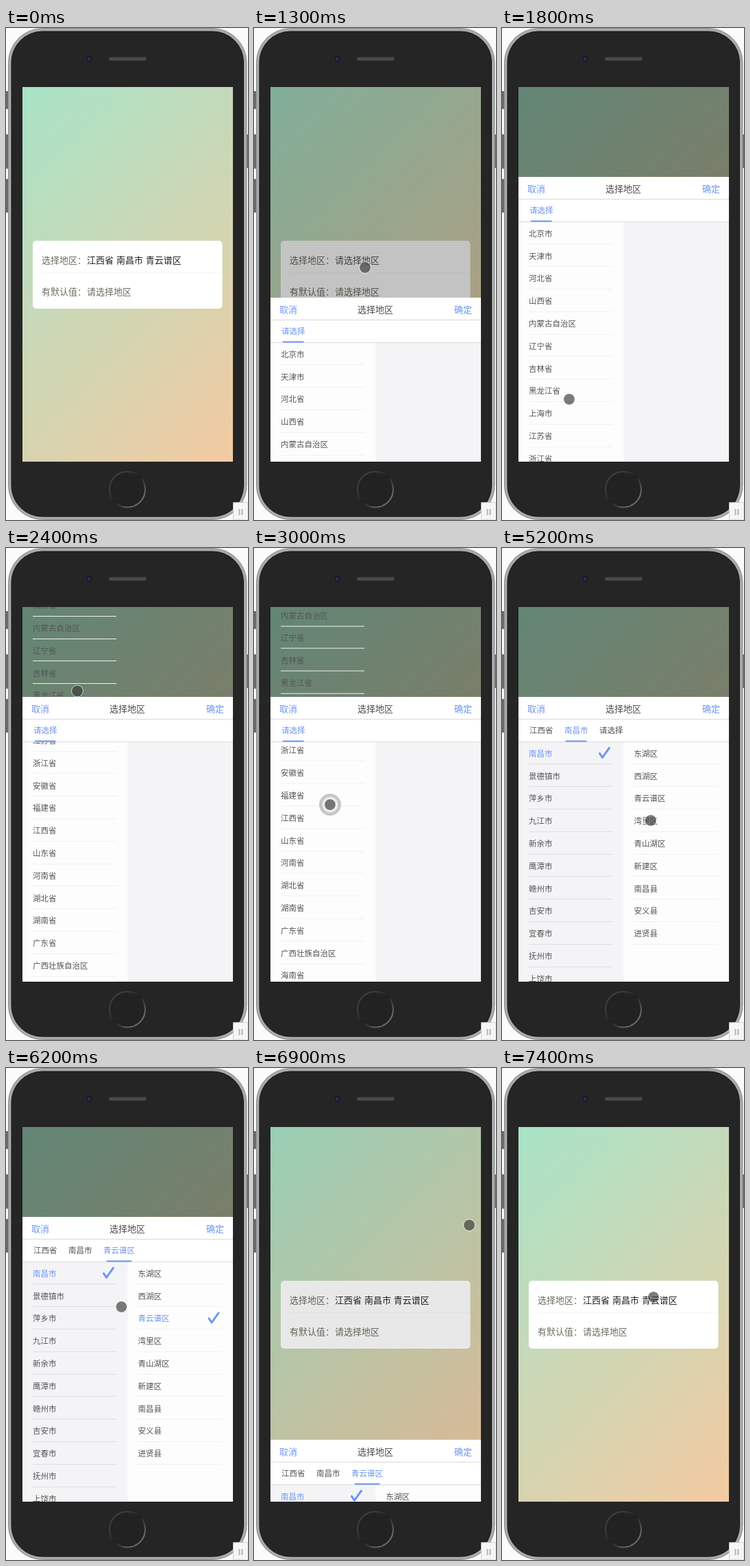
Recreate the animation shown at these times as an HTML page. Size 353 by 717 pixels, loop 7500 ms.

```html
<!DOCTYPE html>
<html lang="zh-CN">
<head>
<meta charset="utf-8">
<title>选择地区</title>
<style>
  html, body { margin: 0; height: 100%; overflow: hidden; background: #fbfbfb; }
  svg { display: block; }
  text { font: 13px "Noto Sans CJK SC", "Noto Sans CJK", sans-serif; fill: #4c4c4c; white-space: pre; }
  .small { font-size: 11.5px; fill: #555; }
  .label { fill: #6c6d60; }
  .blue, .small.blue { fill: #6c96f2; }
  .check { fill: none; stroke: #6c96f2; stroke-width: 3; stroke-linecap: round; stroke-linejoin: round; }
</style>
</head>
<body>
<svg width="353" height="717" viewBox="0 0 353 717">
  <defs>
    <linearGradient id="wall" gradientUnits="userSpaceOnUse" x1="-36" y1="146" x2="391" y2="572">
      <stop stop-color="#a8e3c7"/><stop offset="1" stop-color="#f3caa2"/>
    </linearGradient>
    <linearGradient id="rim" x2="1" y2="1">
      <stop stop-color="#484848"/><stop offset=".3" stop-color="#3a3a3a"/>
      <stop offset=".5" stop-color="#1c1c1c"/><stop offset=".7" stop-color="#555"/>
      <stop offset="1" stop-color="#8a8a8a"/>
    </linearGradient>
    <clipPath id="screen"><rect x="24" y="86" width="307" height="546"/></clipPath>
  </defs>

  <path d="M1.5 92v26M1.5 155v50M1.5 220v49M351.5 155v49" stroke="#6b6b6d" stroke-width="3"/>
  <rect x="3.5" y=".5" width="347.5" height="716" rx="50" fill="#a9aaac" stroke="#8b8c8e"/>
  <rect x="8" y="5" width="338.500" height="707" rx="45" fill="#252526" stroke="#151515"/>
  <circle cx="121.500" cy="45" r="4.500" fill="#1b1b2c"/>
  <circle cx="121.500" cy="45" r="2" fill="#34345c"/>
  <rect x="150" y="42.500" width="55" height="5" rx="2.500" fill="#4a4a4b"/>
  <circle cx="177" cy="672.500" r="26" fill="#222223" stroke="url(#rim)" stroke-width="2"/>

  <g clip-path="url(#screen)">
    <rect x="24" y="86" width="307" height="546" fill="url(#wall)"/>
    <rect x="39" y="310" width="276.500" height="99" rx="5" fill="#fff"/>
    <path d="M52 356.500H315" stroke="#f7f7f7"/>
    <g id="form"></g>
    <rect id="shade" x="24" y="86" width="307" height="546"/>
    <g id="sheet">
      <g id="columns"></g>
      <rect x="24" width="307" height="66" fill="#fff"/>
      <path d="M24 32.500H331M24 65.500H331" stroke="#d9d9db"/>
      <g id="header"></g>
      <rect id="underline" y="63.500" height="2" rx="1" fill="#6c96f2"/>
    </g>
  </g>

  <g id="pointer">
    <g id="ripple">
      <circle r="16" fill="#999" fill-opacity=".55"/>
      <circle r="11.500" fill="#fff" fill-opacity=".65"/>
    </g>
    <circle r="8" fill="#3c3c3c" fill-opacity=".68"/>
    <circle r="8.500" fill="none" stroke="#fff" stroke-opacity=".6"/>
  </g>

  <path d="M331.500 717V691.500H353V717Z" fill="#f6f6f6" stroke="#cfcfcf"/>
  <path d="M340.500 701v9M344.500 701v9" stroke="#b5b5b5" stroke-width="2"/>
</svg>

<script>
const LOOP = 7500, TICK = 100;
const ROW = 32.8, HALF = 153.5, TOP = 217, BOTTOM = 632, LIST_TOP = 66;
const PROVINCE_AT = 3500, CITY_AT = 4100, DISTRICT_AT = 5800, CONFIRM_AT = 6900;
const PICKED = ['江西省', '南昌市', '青云谱区'];
const LISTS = [
  '北京市 天津市 河北省 山西省 内蒙古自治区 辽宁省 吉林省 黑龙江省 上海市 江苏省 浙江省 安徽省 福建省 江西省 山东省 河南省 湖北省 湖南省 广东省 广西壮族自治区 海南省 重庆市',
  '南昌市 景德镇市 萍乡市 九江市 新余市 鹰潭市 赣州市 吉安市 宜春市 抚州市 上饶市',
  '东湖区 西湖区 青云谱区 湾里区 青山湖区 新建区 南昌县 安义县 进贤县'
].map(names => names.split(' '));

// Keyframes: time followed by the animated values.
const SCROLL = [[1800, 0], [2500, 332.4]];
const POINTER = [
  [1000, 162, 349], [1300, 162, 349], [1800, 98, 541], [2300, 104, 185], [2500, 104, 232],
  [2600, 104, 232], [2950, 111, 374], [3100, 111, 374], [3300, 114, 391], [3500, 114, 391],
  [3900, 214, 300], [4200, 214, 300], [5200, 217, 397], [5500, 206, 366], [5800, 206, 366],
  [6300, 164, 346], [6700, 314, 229], [6900, 314, 229], [7400, 221, 334]
];
const PRESSES = [[1100, 1200], [3000, 3200], [3400, 3500], [4000, 4100], [5600, 5800], [6700, 6900]];

const $ = id => document.getElementById(id);

function add(parent, tag, attrs, content = '') {
  const node = document.createElementNS('http://www.w3.org/2000/svg', tag);
  for (const key in attrs) node.setAttribute(key, attrs[key]);
  node.textContent = content;
  return parent.appendChild(node);
}

const label = (parent, x, y, content, cls = '') =>
  add(parent, 'text', { x, y, dy: '.38em', class: cls }, content);

const move = (node, x, y) => node.setAttribute('transform', `translate(${x} ${y})`);
const show = (node, visible) => node.setAttribute('visibility', visible ? 'inherit' : 'hidden');

// The CSS "ease" curve, solved by bisection.
function ease(x) {
  if (x <= 0 || x >= 1) return x <= 0 ? 0 : 1;
  const bezier = (a, b, s) => 3 * a * (1 - s) ** 2 * s + 3 * b * (1 - s) * s * s + s ** 3;
  let low = 0, high = 1;
  for (let i = 0; i < 20; i++) {
    const mid = (low + high) / 2;
    if (bezier(.25, .25, mid) < x) low = mid; else high = mid;
  }
  return bezier(.1, 1, low);
}

function track(keys, t) {
  const next = keys.findIndex(key => key[0] > t);
  if (next < 0) return keys[keys.length - 1].slice(1);
  if (next === 0) return keys[0].slice(1);
  const a = keys[next - 1], b = keys[next];
  const u = (t - a[0]) / (b[0] - a[0]), s = u * u * (3 - 2 * u);
  return a.slice(1).map((v, i) => v + (b[i + 1] - v) * s);
}

label($('form'), 52, 338, '选择地区：', 'label');
label($('form'), 52, 384, '有默认值：', 'label');
const value = label($('form'), 118, 338, '');
value.style.wordSpacing = '1px';
label($('form'), 118, 384, '请选择地区', 'label');

label($('header'), 37, 17, '取消', 'blue');
label($('header'), 151, 17, '选择地区');
label($('header'), 292, 17, '确定', 'blue');
const tabs = [0, 1, 2].map(i => label($('header'), 40 + 51 * i, 49, '', 'small'));

const columns = LISTS.map((names, i) => {
  const x = 24 + HALF * i;
  add($('columns'), 'rect', { x, y: LIST_TOP, width: HALF + .5, height: 350, fill: i === 1 ? '#f4f4f7' : '#fdfdfd' });
  const list = add($('columns'), 'g', {});
  names.forEach((name, n) => {
    const y = LIST_TOP + ROW * (n + .5);
    add(list, 'path', { d: `M${x + 15} ${Math.round(y + 16) - .5}h122`, stroke: i === 1 ? '#e0e0e4' : '#f1f1f1' });
    const text = label(list, x + 15, y, name, 'small');
    if (name === PICKED[i]) {
      list.pick = text;
      list.check = add(list, 'path', { d: `M${x + 118.5} ${y}l4 6 10-14`, class: 'check' });
    }
  });
  return list;
});

function draw(t) {
  const open = ease((t - 1200) / 300) - ease((t - 6800) / 208);
  const chosen = [PROVINCE_AT, CITY_AT, DISTRICT_AT].filter(at => t >= at).length;
  const active = Math.max(0, chosen - 1);

  const filled = t < 1000 || t >= CONFIRM_AT;
  value.textContent = filled ? PICKED.join(' ') : '请选择地区';
  value.style.fill = filled ? '#222' : '#555';

  $('shade').setAttribute('opacity', .41 * open);
  move($('sheet'), 0, BOTTOM + (TOP - BOTTOM) * open);
  move($('columns'), -HALF * ease((t - CITY_AT) / 300), 0);
  move(columns[0], 0, -track(SCROLL, t)[0]);
  columns.forEach((list, i) => {
    show(list, chosen >= i);
    show(list.check, chosen > i);
    list.pick.classList.toggle('blue', chosen > i);
  });

  tabs.forEach((tab, i) => {
    tab.textContent = i < chosen ? PICKED[i] : i === chosen ? '请选择' : '';
    tab.classList.toggle('blue', i === active);
  });
  const size = tabs[active].textContent.length, width = 13 + 6 * size;
  $('underline').setAttribute('x', 40 + 51 * active + (11.5 * size - width) / 2);
  $('underline').setAttribute('width', width);

  show($('pointer'), t >= 1000);
  move($('pointer'), ...track(POINTER, t));
  show($('ripple'), PRESSES.some(([from, to]) => t >= from && t < to));
}

function frame() {
  draw(Math.floor(performance.now() % LOOP / TICK) * TICK);
  requestAnimationFrame(frame);
}
frame();
</script>
</body>
</html>
```
